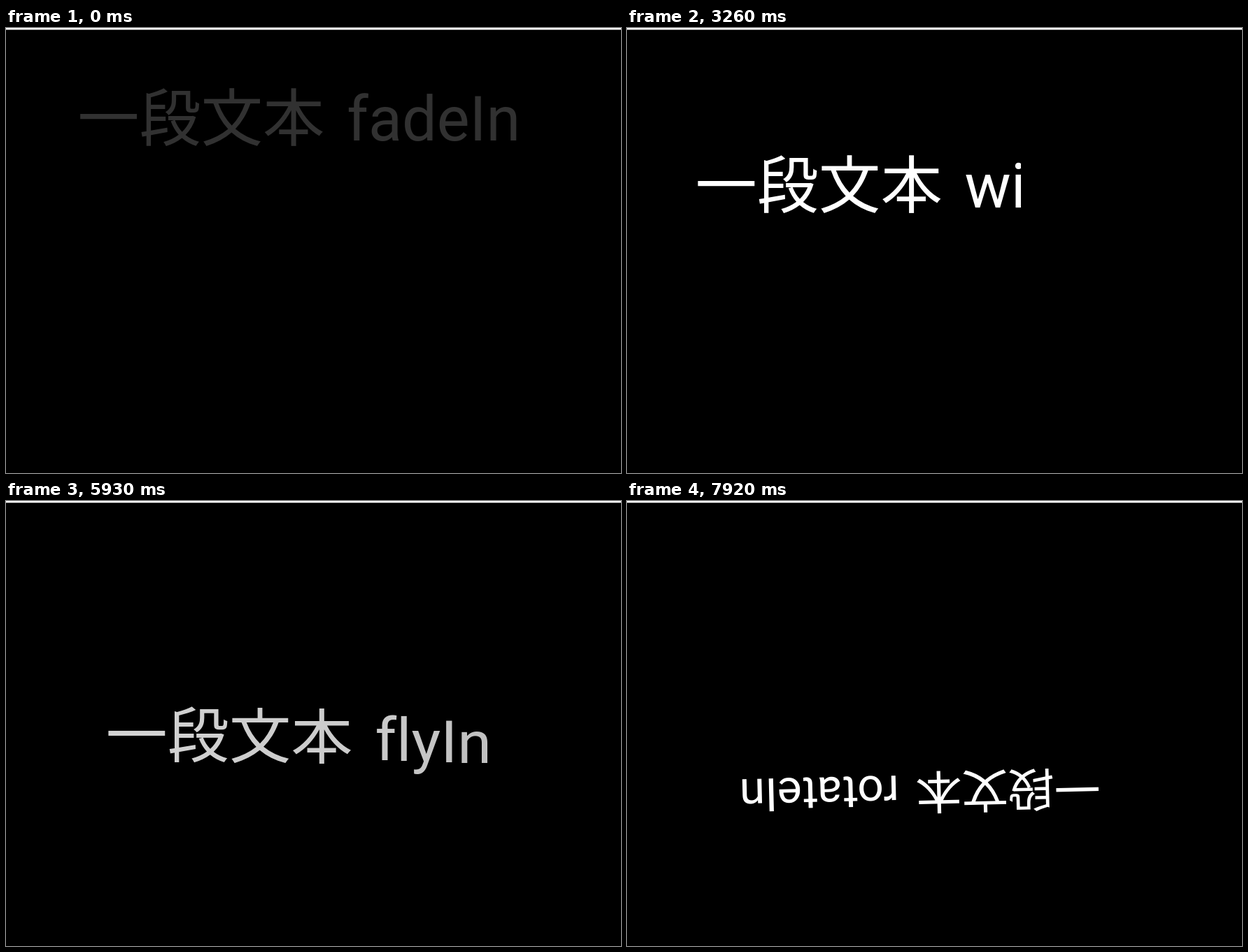
Animation of 879 by 637 pixels, one loop 7.99 s. Source, as an HTML page:

```html
<!DOCTYPE html>
<html lang="ja">
<head>
<meta charset="utf-8">
<title>Text animations</title>
<style>
  html, body { margin: 0; width: 100%; height: 100%; overflow: hidden; background: #000; }
  svg { display: block; width: 100%; height: 100%; }
  text { white-space: pre; font-size: 88.3px; font-variant-ligatures: none; }
  .han { font-family: "Noto Sans CJK JP", "Noto Sans CJK", sans-serif; }
  .latin { font-family: Roboto, sans-serif; }
</style>
</head>
<body>
<svg id="stage" viewBox="0 0 879 637" xmlns="http://www.w3.org/2000/svg">
  <defs><clipPath id="wipe"><rect id="wipeBox" x="97" y="150" width="0" height="150"/></clipPath></defs>
  <rect width="879" height="637" fill="#000"/>
  <rect width="879" height="2.5" fill="#fff"/>
</svg>
<script>
const LOOP = 7990;
const HAN = "一段文本";
const HAN_STEP = 88.3;
const LATIN_SHIFT = 385;
const CENTER_X = 418.5;
const WIPE_LEFT = 97;
const WIPE_WIDTH = 641;

const stage = document.getElementById("stage");
const wipeBox = document.getElementById("wipeBox");

function add(parent, tag, attrs, content = "") {
  const el = document.createElementNS(stage.namespaceURI, tag);
  for (const key in attrs) el.setAttribute(key, attrs[key]);
  el.textContent = content;
  return parent.appendChild(el);
}

function addLine(word, x, y) {
  const group = add(stage, "g", { fill: "#fff" });
  add(group, "text", { class: "han", x, y }, HAN);
  add(group, "text", { class: "latin", x: x + LATIN_SHIFT, y }, word);
  return group;
}

// One text element per glyph, kept with its place in the line for the stagger.
function addGlyphs(word, x, y) {
  const probe = add(stage, "text", { class: "latin", x: x + LATIN_SHIFT, y }, word);
  const starts = [...word].map((_, i) => probe.getStartPositionOfChar(i).x);
  probe.remove();
  const han = [...HAN].map((c, i) => ({
    order: i,
    el: add(stage, "text", { class: "han", x: x + i * HAN_STEP, y }, c)
  }));
  const latin = [...word].map((c, i) => ({
    order: HAN.length + 1 + i,
    el: add(stage, "text", { class: "latin", x: starts[i], y }, c)
  }));
  return han.concat(latin);
}

const fadeLine = addLine("fadeIn", 102.2, 161.3);
const wipeLine = addLine("wipeIn", 97.5, 257);
wipeLine.setAttribute("clip-path", "url(#wipe)");
const flyGlyphs = addGlyphs("flyIn", 142.4, 353);
const rotateLine = addLine("rotateIn", 73.2, 448.7);

const progress = (t, start, duration) => Math.min(1, Math.max(0, (t - start) / duration));
const easeOut = (u, power) => 1 - Math.pow(1 - u, power);

// White at the given coverage over black, blended in linear light.
function paint(el, alpha) {
  el.style.display = alpha > 0.001 ? "" : "none";
  const level = alpha <= 0.0031308 ? 12.92 * alpha : 1.055 * Math.pow(alpha, 1 / 2.4) - 0.055;
  const v = Math.round(255 * level);
  el.setAttribute("fill", `rgb(${v},${v},${v})`);
}

function drawFade(t) {
  paint(fadeLine, progress(t, -60, 2020) * (1 - progress(t, 1990, 265)));
}

function drawWipe(t) {
  const p = easeOut(progress(t, 2258, 2100), 2);
  wipeBox.setAttribute("width", p * WIPE_WIDTH);
  paint(wipeLine, p > 0 ? 1 - progress(t, 4358, 262) : 0);
}

function drawFly(t) {
  const out = 1 - progress(t, 6880, 265);
  const centerY = 321;
  for (const { el, order } of flyGlyphs) {
    const u = progress(t, 4630 + order * 25, 2022);
    const y = centerY + 108 * (1 - easeOut(u, 2));
    const scale = easeOut(u, 3.7);
    el.setAttribute("transform", `translate(0 ${y}) scale(1 ${scale}) translate(0 ${-centerY})`);
    paint(el, u * out);
  }
}

function drawRotate(t) {
  const p = easeOut(progress(t, 7184, 2000), 3);
  const centerY = 416.5;
  rotateLine.setAttribute("transform",
    `translate(${CENTER_X} ${centerY}) rotate(${720 * p}) scale(${p}) translate(${-CENTER_X} ${-centerY})`);
  paint(rotateLine, p > 0 ? 1 : 0);
}

function draw(t) {
  drawFade(t);
  drawWipe(t);
  drawFly(t);
  drawRotate(t);
}

const startTime = performance.now();
function tick() {
  draw((performance.now() - startTime) % LOOP);
  requestAnimationFrame(tick);
}
tick();
</script>
</body>
</html>
```
